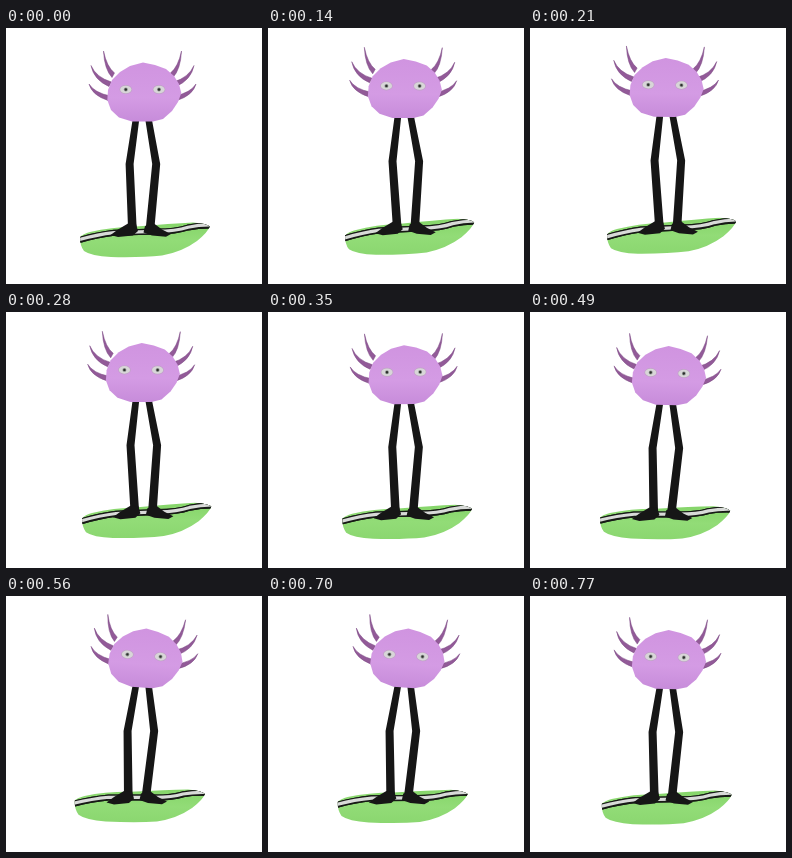
Recreate the animation shown at these times as an HTML page. Size 256 by 256 pixels, loop 840 ms.

```html
<!DOCTYPE html>
<html lang="en">
<head>
<meta charset="utf-8">
<title>Surfing axolotl</title>
<style>
html, body { margin: 0; width: 100%; height: 100%; overflow: hidden; background: #fff; }
svg { display: block; width: 100vw; height: 100vh; }
</style>
</head>
<body>
<svg viewBox="0 0 256 256">
  <defs>
    <linearGradient id="skin" x1="0" y1="0" x2="0" y2="1">
      <stop offset="0" stop-color="#d094e0"/>
      <stop offset=".6" stop-color="#d49be4"/>
      <stop offset="1" stop-color="#c78cda"/>
    </linearGradient>
    <linearGradient id="paint" x1="0" y1="0" x2="0" y2="1">
      <stop offset="0" stop-color="#84d468"/>
      <stop offset=".5" stop-color="#92dc77"/>
      <stop offset="1" stop-color="#8ad66f"/>
    </linearGradient>
    <clipPath id="deck">
      <path d="M74 209 Q77 206 84 204 Q105 199 130 198.5 Q165 195.5 187 194.5 Q201 195.5 203.8 198.5 Q202 204 191 213 Q176 224 156 227.5 Q135 229.7 105 229 Q85 228 78 223 Q74 218 74 209Z"/>
    </clipPath>
  </defs>
  <g id="board" clip-path="url(#deck)">
    <rect x="70" y="193" width="138" height="38" fill="url(#paint)"/>
    <g fill="none">
      <path id="stripe" d="M70 213 Q90 207 108 204.8 L150 203.6 Q170 203.5 182 199.5 Q194 197 208 197.5" stroke="#171a16" stroke-width="6"/>
      <use href="#stripe"/>
      <path d="M70 212.6 Q90 206.6 108 204.6 L150 203.4 Q170 203.2 182 199.2 Q194 196.7 208 197" stroke="#d8dad8" stroke-width="3.2"/>
    </g>
  </g>
  <g fill="#161616">
    <path id="legL"/>
    <path id="legR"/>
    <g id="feet">
      <path d="M104.5 207 L112 201.5 L122 195.5 L130 196 L132 203 L127 207.5 L112 209Z"/>
      <path d="M139 198 L148 195.5 L156 201.5 L165 206 L160 208.8 L146 207.5 L137.5 204.5Z"/>
    </g>
  </g>
  <g id="head">
    <g id="gills" fill="#925a98" stroke="#7d4a84" stroke-width=".5"></g>
    <use href="#gills" transform="matrix(-1 0 0 1 273 0)"/>
    <path fill="url(#skin)" d="M137 34.5 L149 37 L160 41 L168 48 L173 56 L175.3 65 L172 74 L166 83 L157 91 L147 93.5 L126 93.5 L113 89.5 L105 82 L101.3 72 L102 62 L106 52 L114 44 L124 38Z"/>
    <g id="eyes"></g>
  </g>
</svg>
<script>
const LOOP = 840, STEP = 70;
const $ = id => document.getElementById(id);
const set = (id, name, value) => $(id).setAttribute(name, value);

// Thin hook from a wide base on the head up to a pointed tip
function gill(tx, ty, bx, by) {
  const cx = tx + (bx - tx) * .2, cy = ty + (by - ty) * .7;
  return `<path d="M${tx} ${ty} Q${cx + 1.4} ${cy - 1} ${bx + 1.5} ${by - 2} L${bx - 1} ${by + 2.5} Q${cx - 1} ${cy + 1.5} ${tx} ${ty}Z"/>`;
}

function leg(hip, knee, foot) {
  const [hx, hy] = hip, [kx, ky] = knee, [fx, fy] = foot;
  return `M${hx - 3.3} ${hy} L${hx + 3.3} ${hy} L${kx + 4} ${ky} L${fx + 4.3} ${fy} L${fx - 4.3} ${fy} L${kx - 4} ${ky}Z`;
}

function draw(phase) {
  const sway = Math.sin(phase);
  const lift = sway * sway;
  const lag = 1 - Math.cos(phase);

  const headY = -3.6 * lift - .95 * sway;
  const turn = 2.8 * lift - 2.1 * sway;
  set("head", "transform", `translate(${-1.6 * sway} ${headY}) rotate(${turn} 138 64)`);

  const kneeX = 1.7 * sway - .75 * lift, kneeY = 136 - 2.5 * lift - sway;
  const footX = 3.7 * sway - .4 * lift - .35 * lag, footY = -1.6 * lift - .7 * sway;
  const hipY = 91 + headY, ankleY = 199 + footY;
  set("feet", "transform", `translate(${footX} ${footY})`);
  set("legL", "d", leg([130, hipY], [123.6 + kneeX, kneeY], [126.3 + footX, ankleY]));
  set("legR", "d", leg([142.5, hipY], [150.2 + kneeX, kneeY], [144.2 + footX, ankleY]));

  // The board is moved by its two ends
  const tailX = 4.3 * sway - .3 * lift - lag, tailY = .9 * sway - 2.4 * lift - 1.2 * lag;
  const noseX = 3.75 * sway - .6 * lift - .8 * lag, noseY = -2 * sway - 3 * lift;
  const left = 74, width = 130;
  const sx = (noseX - tailX) / width, sy = (noseY - tailY) / width;
  set("board", "transform", `matrix(${1 + sx} ${sy} 0 1 ${tailX - sx * left} ${tailY - sy * left})`);
}

$("gills").innerHTML = gill(97.5, 23, 107, 47) + gill(85, 37.5, 104, 56) + gill(83, 56, 103, 70);
$("eyes").innerHTML = [119.8, 153].map(x => `
  <ellipse cx="${x}" cy="61.5" rx="6.3" ry="4.5" fill="#bfa3c6"/>
  <ellipse cx="${x}" cy="61.5" rx="5.6" ry="3.8" fill="#d8d6d8"/>
  <circle cx="${x}" cy="61.5" r="2" fill="#8f9691"/>
  <circle cx="${x}" cy="61.5" r="1.2" fill="#2c2c2c"/>`).join("");

const start = performance.now();
function tick(now) {
  const t = Math.max(0, now - start) % LOOP;
  draw(Math.floor(t / STEP) * STEP / LOOP * 2 * Math.PI);
  requestAnimationFrame(tick);
}
draw(0);
requestAnimationFrame(tick);
</script>
</body>
</html>
```
